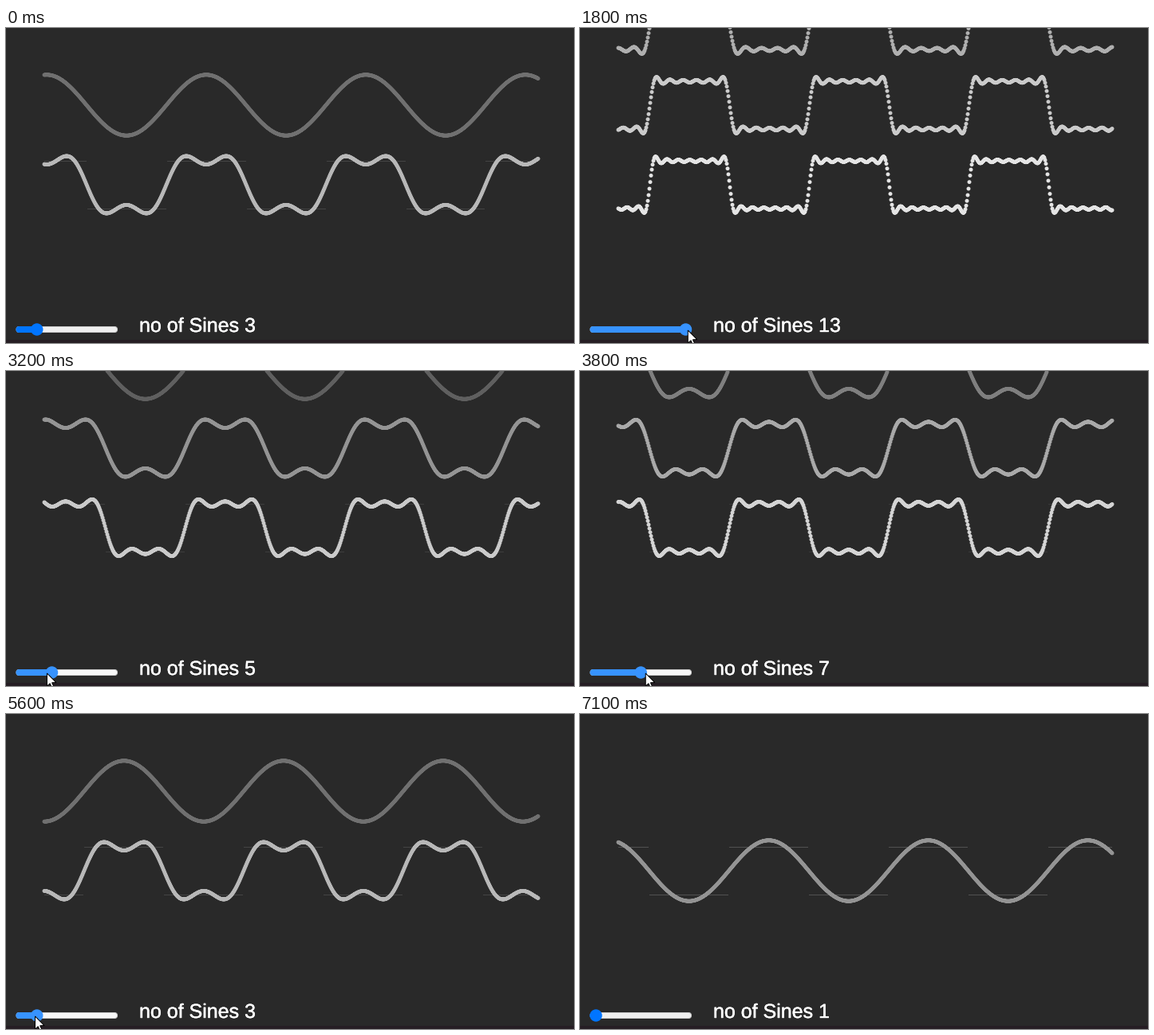
Animation, 712 px wide and 396 px high, one loop 7200 ms. Source, as a matplotlib script:

```python
import numpy as np
import matplotlib.pyplot as plt
from matplotlib import patheffects
from matplotlib.animation import FuncAnimation
from matplotlib.patches import Circle, FancyBboxPatch, PathPatch, Polygon, Rectangle
from matplotlib.path import Path

W, H, DPI = 712, 396, 100
FRAMES, INTERVAL = 72, 100
PX = 72 / DPI

BACK = 41
LEFT, RIGHT, PERIOD = 48, 668, 200
BASE_Y, ROW_GAP, AMP = 197, 100, 30
ROWS, MAX_TERMS = 3, 7
FIRST_CREST = 51
TRACK_LEFT, TRACK_RIGHT, TRACK_Y = 12.5, 140, 379
THUMB_MIN, THUMB_STEP = 20, 18.75
SHOW, HOVER, LEAVE = 8, 9, 65

# Turning points of the dragging pointer: (frame, x)
TURNS = [(7, 36), (10, 47), (19, 137.5), (34, 47), (43, 131), (56, 36),
         (60, 36), (63, 19)]


def pointer_x(f):
    """Cosine easing between the turning points."""
    times, places = zip(*TURNS)
    f = np.clip(f, times[0], times[-1])
    i = min(np.searchsorted(times, f, side="right"), len(times) - 1)
    u = (f - times[i - 1]) / (times[i] - times[i - 1])
    ease = (1 - np.cos(np.pi * u)) / 2
    return places[i - 1] + (places[i] - places[i - 1]) * ease


def pointer_y(f):
    return 379.5 + 3 * max(0, 10 - f)


def term_count(f):
    """Number of summed sines; the slider trails the pointer by one frame."""
    step = round((pointer_x(f - 1) - 19) / THUMB_STEP)
    return int(np.clip(step + 1, 1, MAX_TERMS))


# The waves run left, slower the more sines are drawn.
terms = np.array([term_count(f) for f in range(FRAMES)])
speed = 8.4 - 0.7 * terms
crest = FIRST_CREST + speed[0] - np.cumsum(speed)
xs = np.arange(LEFT, RIGHT, 1.0)


def grey(level):
    return (level / 255,) * 3


def wave(k, shift):
    theta = 2 * np.pi * (xs - shift) / PERIOD
    m = np.arange(k)[:, None]
    odd = 2 * m + 1
    return AMP * 4 / np.pi * ((-1.0) ** m * np.cos(odd * theta) / odd).sum(axis=0)


def dots_path(y):
    """Tiny strokes whose round caps make the dots."""
    verts = np.empty((2 * len(xs), 2))
    verts[0::2] = np.column_stack([xs, y])
    verts[1::2] = np.column_stack([xs + 0.05, y])
    codes = np.tile([Path.MOVETO, Path.LINETO], len(xs))
    path = Path(verts, codes)
    path.should_simplify = False
    return path


fig = plt.figure(figsize=(W / DPI, H / DPI), dpi=DPI, facecolor=grey(BACK))
ax = fig.add_axes([0, 0, 1, 1])
ax.set_xlim(0, W)
ax.set_ylim(H, 0)
ax.axis("off")


def rounded_bar(inset, z):
    r = 4 - inset
    bar = FancyBboxPatch((TRACK_LEFT + inset, TRACK_Y - r),
                         TRACK_RIGHT - TRACK_LEFT - 2 * inset, 2 * r,
                         boxstyle=f"round,pad=0,rounding_size={r}",
                         ec="none", lw=PX, snap=False, zorder=z)
    return ax.add_patch(bar)


ax.add_patch(Rectangle((0, 392), W, 4, fc="#261e24", ec="none"))

square_high, square_low = (
    ax.plot([], [], lw=PX, snap=False, solid_capstyle="butt", zorder=1)[0]
    for _ in range(2))

rows = [ax.add_patch(PathPatch(dots_path(xs * 0), fc="none", lw=5 * PX,
                               capstyle="round", snap=False, zorder=2))
        for _ in range(ROWS)]

track = rounded_bar(0.5, 3)
track.set_edgecolor("#c8c8c8")
fill = rounded_bar(0, 4)
thumb = ax.add_patch(Circle((THUMB_MIN, TRACK_Y), 7.7, ec="none", zorder=5))
label = ax.text(167, 382, "", color="white", family="Liberation Sans",
                fontsize=25 * PX, va="baseline", ha="left", zorder=5)
label.set_path_effects([patheffects.withStroke(linewidth=0.4 * PX,
                                               foreground="white")])

ARROW = np.array([(0, 0), (0, 16.2), (3.7, 12.8), (6.2, 18.5),
                  (8.7, 17.4), (6.2, 11.8), (11.5, 11.6)])
arrow = ax.add_patch(Polygon(ARROW, fc="white", ec="black", lw=PX, zorder=6))


def draw_waves(n, shift):
    for i, row in enumerate(rows):
        k = n - i
        row.set_visible(k > 0)
        if k > 0:
            row.set_path(dots_path(BASE_Y - i * ROW_GAP - wave(k, shift)))
            row.set_edgecolor(grey(BACK + (255 - BACK) * k / (n + 1)))

    high = np.cos(2 * np.pi * (xs - shift) / PERIOD) >= 0
    for line, mask, y in ((square_high, high, BASE_Y - AMP + 0.5),
                          (square_low, ~high, BASE_Y + AMP + 0.5)):
        line.set_data(xs, np.where(mask, y, np.nan))
        line.set_color(grey(BACK + 80 / (n + 1)))


def draw_slider(n, hover):
    x = THUMB_MIN + THUMB_STEP * (n - 1)
    blue = "#3793ff" if hover else "#0075ff"
    track.set_facecolor("#f7f7f7" if hover else "#efefef")
    fill.set_width(x - TRACK_LEFT)
    fill.set_facecolor(blue)
    thumb.center = x, TRACK_Y
    thumb.set_facecolor(blue)
    label.set_text(f"no of Sines {2 * n - 1}")


def update(f):
    n = terms[f]
    draw_waves(n, crest[f])
    draw_slider(n, HOVER <= f < LEAVE)
    arrow.set_visible(SHOW <= f < LEAVE)
    arrow.set_xy(ARROW + (pointer_x(f) + 0.5, pointer_y(f) + 0.5))
    return [*rows, square_high, square_low, track, fill, thumb, label, arrow]


anim = FuncAnimation(fig, update, frames=FRAMES, interval=INTERVAL,
                     repeat=True, repeat_delay=0, blit=False)
plt.show()
```
